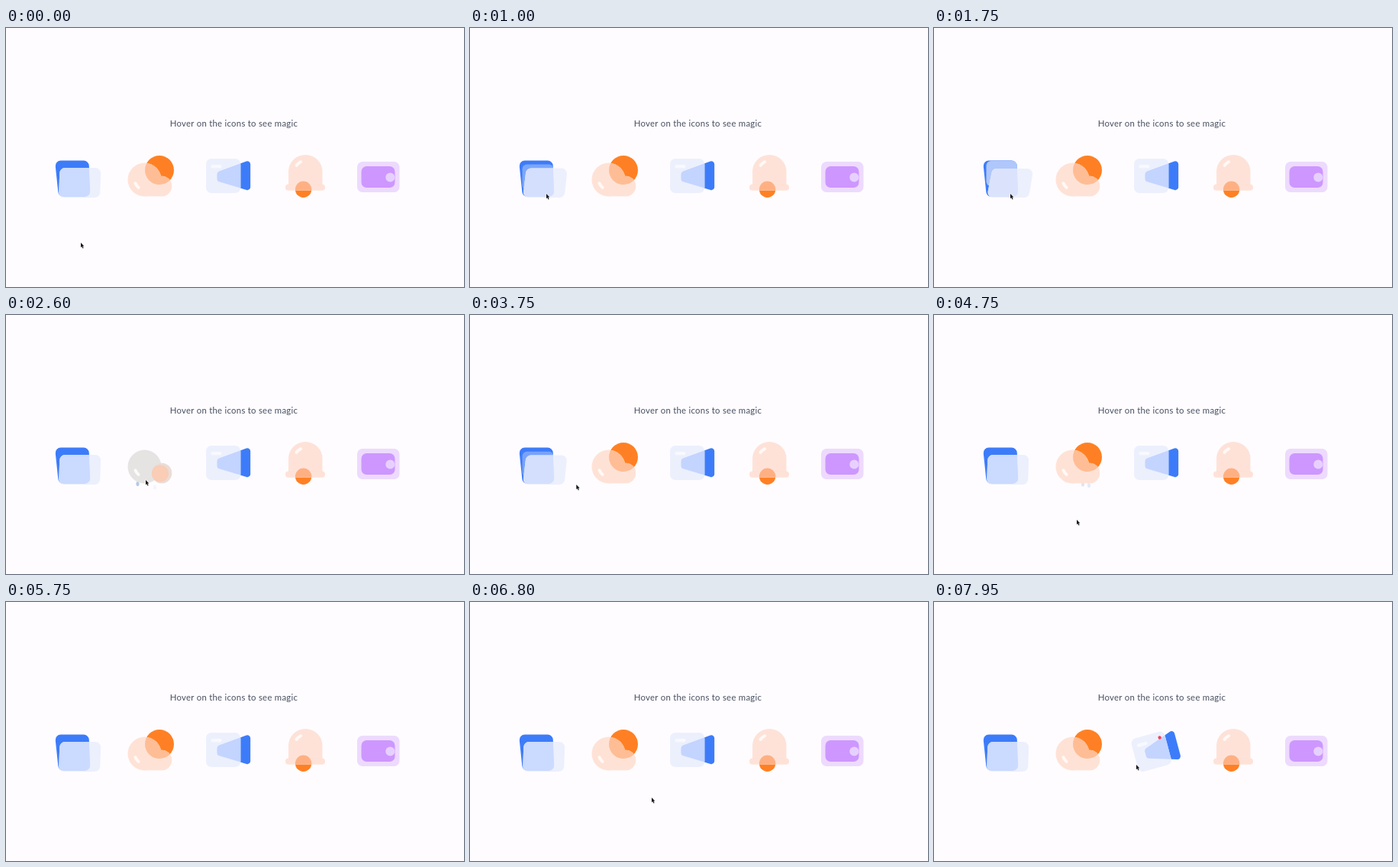
Animation, 600 px wide and 339 px high, one loop 8000 ms. Source, as an HTML page with a canvas:

```html
<!DOCTYPE html>
<html lang="en">
<head>
<meta charset="utf-8">
<title>Hover icons</title>
<style>
  html, body { margin: 0; width: 100%; height: 100%; overflow: hidden; background: #fefcff; }
  canvas { position: absolute; left: 0; top: 0; width: 600px; height: 339px; }
  p {
    position: absolute; left: 0; top: 118px; width: 597px; margin: 0;
    text-align: center; color: #485062;
    font: 11.4px/14px Lato, sans-serif; letter-spacing: .25px;
  }
</style>
</head>
<body>
<canvas id="stage"></canvas>
<p>Hover on the icons to see magic</p>
<script>
const LOOP = 8000, MOVE = 300;
const BLUE = '#3d7cf9', ORANGE = '#ff8024', GLASS = '#ecf0fd';

const canvas = document.getElementById('stage');
const ctx = canvas.getContext('2d');
const dpr = window.devicePixelRatio || 1;
canvas.width = 600 * dpr;
canvas.height = 339 * dpr;

const clamp = v => Math.max(0, Math.min(1, v));
const lerp = (a, b, k) => a + (b - a) * k;
const ease = v => { v = clamp(v); return v * v * (3 - 2 * v); };
const mix = (a, b, k) => `rgb(${a.map((v, i) => Math.round(lerp(v, b[i], k))).join()})`;

// Each move sets off at a time towards a point and lasts MOVE ms
const home = { x: 98, y: 281 };
const moves = [
  { at: 0, x: 98, y: 268 },
  { at: 600, x: 100, y: 217 },
  { at: 1800, x: 130, y: 268 },
  { at: 2050, x: 183, y: 216 },
  { at: 3000, x: 165, y: 268 },
  { at: 3250, x: 110, y: 217 },
  { at: 3600, x: 168, y: 227 },
  { at: 3900, x: 186, y: 215 },
  { at: 4350, x: 187, y: 268 },
  { at: 6000, x: 238, y: 256 },
  { at: 7500, x: 265, y: 213 }
];
const isHidden = t => t >= 5500 && t < 6000;

function pointer(t) {
  return moves.reduce((p, m) => {
    const k = ease((t - m.at) / MOVE);
    return { x: lerp(p.x, m.x, k), y: lerp(p.y, m.y, k) };
  }, home);
}

// Times at which the pointer enters and leaves a rectangle
function visits(left, top, right, bottom) {
  const spans = [];
  let inside = false;
  for (let t = 0; t <= LOOP; t += 10) {
    const { x, y } = pointer(t);
    const hit = x > left && x < right && y > top && y < bottom;
    if (hit && !inside) spans.push([t, Infinity]);
    if (!hit && inside) spans[spans.length - 1][1] = t;
    inside = hit;
  }
  return spans;
}

function hover(t, spans, rise, fall) {
  return Math.max(...spans.map(([a, b]) =>
    ease((t - a) / rise) * (1 - ease((t - b) / fall))));
}

const onFolder = visits(64, 173, 120, 224);
const onCloud = visits(160, 167, 218, 222);
const onVideo = visits(261, 170, 321, 219);

function circle(x, y, r) {
  const p = new Path2D();
  p.arc(x, y, r, 0, Math.PI * 2);
  return p;
}

function box(x, y, w, h, r) {
  const p = new Path2D();
  p.roundRect(x, y, w, h, r);
  return p;
}

function roundPoly(pts, r) {
  const p = new Path2D(), n = pts.length, last = pts[n - 1];
  p.moveTo((last[0] + pts[0][0]) / 2, (last[1] + pts[0][1]) / 2);
  pts.forEach((a, i) => p.arcTo(...a, ...pts[(i + 1) % n], r));
  p.closePath();
  return p;
}

function fill(path, color) {
  ctx.fillStyle = color;
  ctx.fill(path);
}

function overlap(a, b, color) {
  ctx.save();
  ctx.clip(a);
  fill(b, color);
  ctx.restore();
}

function shine(x, y, r, from, to) {
  ctx.beginPath();
  ctx.arc(x, y, r, from * Math.PI / 180, to * Math.PI / 180);
  ctx.lineWidth = 4;
  ctx.lineCap = 'round';
  ctx.strokeStyle = 'rgba(255,255,255,.8)';
  ctx.stroke();
}

function drawFolder(k) {
  const back = roundPoly([[64, 173.5], [108.5, 173.5], [110.5, 221], [69, 221]], 7);
  const top = 183 + k;
  const front = roundPoly([
    [70.5 + 6 * k, top], [124.5 + 6 * k, top], [123 + k, 222], [69, 222]
  ], 7);
  fill(back, BLUE);
  if (k > 0) overlap(back, box(68.5, 184 - 10 * k, 41, 33, 6), `rgba(224,231,253,${.7 * k})`);
  fill(front, GLASS);
  overlap(front, back, mix([203, 218, 255], [219, 227, 252], k));
}

function drawRain(t) {
  const rain = hover(t, onCloud, 260, 620);
  for (const x of [172.5, 195, 203]) {
    const f = (t / 600 + .17 + (x - 172.5) / 50) % 1;
    ctx.globalAlpha = rain * Math.sin(f * Math.PI);
    fill(box(x - 2, 213 + 10 * f, 4, 6, 2), '#b5cae4');
  }
  ctx.globalAlpha = 1;
}

function drawCloud(k) {
  const main = circle(181.5, 198.5, 22);
  const lobe = circle(204, 207, 13.3);
  const sun = circle(lerp(201, 202, k), lerp(186, 207.5, k), lerp(19, 11, k));
  const body = mix([255, 226, 214], [230, 228, 227], k);
  const glow = mix([255, 189, 149], [249, 205, 182], k);
  fill(sun, ORANGE);
  ctx.globalAlpha = 1 - k;
  fill(box(181.5, 205, 22.5, 15.3, 0), body);
  ctx.globalAlpha = 1;
  fill(main, body);
  fill(lobe, mix([255, 226, 214], [234, 221, 215], k));
  overlap(main, sun, glow);
  overlap(lobe, sun, glow);
  shine(181.5, 198.5, 13, 128, 158);
}

function drawVideo(k) {
  ctx.save();
  ctx.translate(290, 194 + k);
  ctx.rotate(-15 * Math.PI / 180 * k);
  ctx.translate(-290, -194);
  const body = box(262, 171, 45.3, 45, 7);
  const lens = roundPoly([[276.5, 188.5], [320.2, 172.5], [320.2, 213.5], [276.5, 200.5]], 4);
  fill(lens, BLUE);
  fill(body, GLASS);
  overlap(body, lens, '#c3d4ff');
  fill(box(268.5, 179, 14, 4.5, 2.2), 'rgba(255,255,255,.6)');
  ctx.globalAlpha = k;
  fill(circle(300, 178.5, 2.2), '#f0435a');
  ctx.restore();
}

function drawBell() {
  const clapper = circle(389.6, 211.2, 10.7);
  fill(clapper, ORANGE);
  fill(box(370, 166, 44.5, 44, [22, 22, 0, 0]), '#fee2d8');
  fill(box(366, 204.5, 52, 8.2, 4), '#fee2d8');
  overlap(box(366, 190, 52, 22.7, 0), clapper, '#ffb083');
  shine(392, 188, 14, 215, 245);
}

function drawWallet() {
  fill(box(460, 175, 55.5, 40, 7), '#eddafd');
  fill(box(465.5, 181, 44, 28, 7), '#cd97ff');
  fill(circle(503.3, 195.5, 6), '#e8d0fe');
}

function drawPointer(t) {
  if (isHidden(t)) return;
  const { x, y } = pointer(t);
  const arrow = new Path2D('M0 0V6.2L1.4 5L2.5 7.5L3.6 7L2.5 4.6L4.4 4.5Z');
  ctx.save();
  ctx.translate(x, y);
  ctx.lineWidth = 1;
  ctx.strokeStyle = 'rgba(255,255,255,.8)';
  ctx.stroke(arrow);
  fill(arrow, '#15151a');
  ctx.restore();
}

function draw(t) {
  ctx.setTransform(dpr, 0, 0, dpr, 0, 0);
  ctx.clearRect(0, 0, 600, 339);
  drawFolder(hover(t, onFolder, 300, 150));
  drawRain(t);
  drawCloud(hover(t, onCloud, 280, 280));
  drawVideo(hover(t, onVideo, 230, 230));
  drawBell();
  drawWallet();
  drawPointer(t);
}

const start = performance.now();
function tick() {
  draw((performance.now() - start) % LOOP);
  requestAnimationFrame(tick);
}
tick();
</script>
</body>
</html>
```
